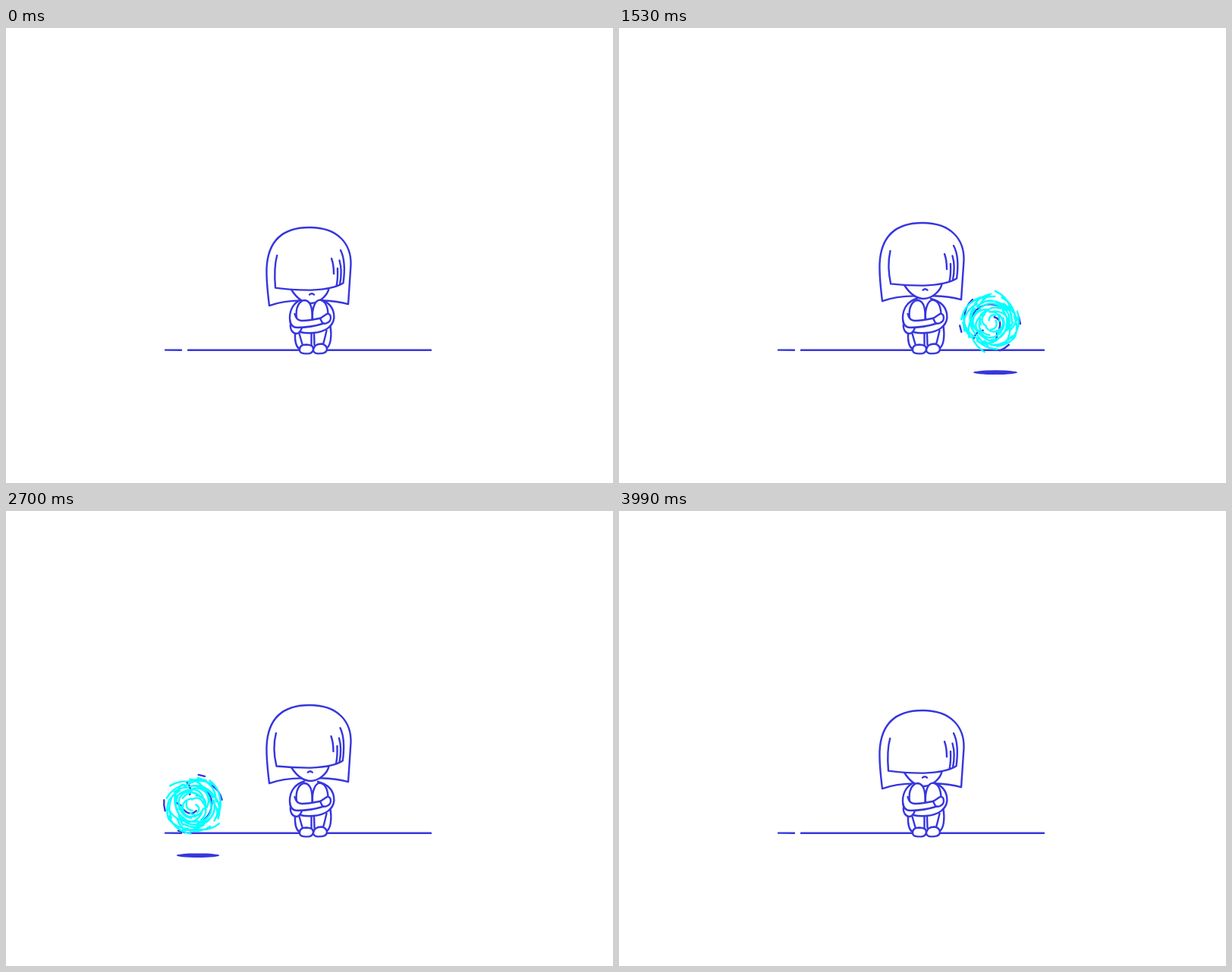
Recreate the animation shown at these times as an HTML page with a canvas. Size 800 by 600 pixels, loop 5850 ms.

```html
<!DOCTYPE html>
<html lang="en">
<head>
<meta charset="utf-8">
<title>Rolling thoughts</title>
<style>
html, body { margin: 0; width: 100%; height: 100%; overflow: hidden; background: #fff; }
canvas { display: block; width: 800px; height: 600px; }
</style>
</head>
<body>
<canvas id="stage" width="800" height="600"></canvas>
<script>
const LOOP = 5850, START = 90, END = 3990, STEP = 30;
const BLUE = '#3636de', CYAN = '#00ffff';
const ctx = document.getElementById('stage').getContext('2d');

// Smooth monotone curve through [time, value] pairs.
function track(...keys) {
  const n = keys.length;
  const slope = keys.slice(1).map((k, i) => (k[1] - keys[i][1]) / (k[0] - keys[i][0]));
  const tangent = keys.map((k, i) => {
    if (i === 0) return slope[0];
    if (i === n - 1) return slope[n - 2];
    const a = slope[i - 1], b = slope[i];
    return a * b <= 0 ? 0 : 2 * a * b / (a + b);
  });
  return t => {
    if (t <= keys[0][0]) return keys[0][1];
    if (t >= keys[n - 1][0]) return keys[n - 1][1];
    let i = 0;
    while (t > keys[i + 1][0]) i++;
    const [t0, v0] = keys[i], [t1, v1] = keys[i + 1];
    const d = t1 - t0, u = (t - t0) / d, w = 1 - u;
    return v0 * (1 + 2 * u) * w * w + tangent[i] * d * u * w * w +
      v1 * u * u * (3 - 2 * u) - tangent[i + 1] * d * u * u * w;
  };
}

const ballX = track([90, 842], [690, 693], [1290, 550], [1530, 490], [1890, 422],
  [2220, 351], [2460, 298], [2700, 248], [3120, 175], [3660, 52], [3990, -45]);
const shadowLag = track([90, -2], [690, -2], [1530, 6], [2220, 0.5], [2700, 5], [3990, 5]);
const headLift = track([90, 0], [390, 3], [690, 6], [1860, 6], [2220, 7], [2400, 7.7],
  [2700, 7], [3120, 5.4], [3690, 2], [3990, 0]);
const lookX = track([90, 0], [690, 2], [1290, 0.5], [1860, 0.5], [2220, -1.7],
  [2700, -2.2], [3120, -0.7], [3690, 0], [3990, 0]);

function line(d, fill) {
  const path = new Path2D(d);
  if (fill) {
    ctx.fillStyle = '#fff';
    ctx.fill(path);
  }
  ctx.stroke(path);
}

function drawFloor() {
  line('M210 424.6L231 424.8M240 424.8H387M423 424.8H560');
}

function drawHair() {
  line('M390 359.4Q365 359.5 347 366.2C345 350 343 333 343.5 317C345 284 361 263 400 263' +
    'C439 263 455 286 454.5 312L451 364.2Q436 360 414 359.3', true);
}

function drawTorso() {
  line('M393 356.5C380 360 374 371 374 382C374 391 378 395 384 395L388 401' +
    'C392 402 399 402.5 405 402C420 401 431 394 432.4 382C432.5 371 427 361 411 357', true);
}

function drawFace(lift, look) {
  const n = lift / 6;
  const left = 355 + 2.8 * n + 0.8 * look, low = 342.6 + 0.8 * n;
  const right = 444.5 + 0.3 * n + 0.5 * look;
  const belly = 353.8 + 0.6 * n + 0.8 * look;
  const side = Math.max(look - 0.5, 0) * 1.4 + Math.min(look, 0) * 0.25;
  line('M376 345C383 356 392 363 402 363C414 362 424 352 425.5 343.5', true);
  line(`M${357.2 + 0.6 * look} 300C${belly} 312 ${belly} 328 ${left} ${low}` +
    `Q${left + 22} 345.8 402 345.6Q432 344.5 ${right} 336.3` +
    `C${right + 2.5} 318 ${right + 1.5} 303 ${441 + side} 293`);
  ctx.save();
  ctx.translate(side, 0);
  line('M429 304Q432 312 432 324M439.5 306.5C442 315 442 328 440 338M437 317Q437.6 330 435.6 340');
  ctx.restore();
  line(`M${400 + look} 351.6Q${403 + look} 349 ${406 + look} 351.6`);
}

function drawLimbs() {
  line('M381 402C380.5 412 382 420 386.5 423M386.5 403L390.5 417M402.5 402V418' +
    'M406 402L406.5 418M422.5 399Q420 410 418 417M427.5 393C429.5 406 428 418 423 422');
  line('M383 383C381 368 387 359 394 359C402 360 404 372 403.5 384', true);
  line('M404 384C403 368 408 358.6 414 358.6C421 360 424 368 424.5 377', true);
  line('M375 390C374 398 378 403 383 403C388 402 389 398 390 395', true);
  line('M380.5 377C382 383 386 386 390 386C400 386 408 384 415 382.5L419 389.5' +
    'C408 393 396 395 384 395C378 395 374.5 391 374.2 384', true);
  line('M414 383L423 377C428 376 429 382 427 386C424 390 419 391 416.5 388Z', true);
  line('M387 424C387 418 392 417.5 396 417.5C402 418 405 419 405 424' +
    'C404 430 398 429.4 394 429.4C389 429 387 428 387 424Z', true);
  line('M405 424C406 418 411 416.5 416 416.5C421 417.5 423 420 423 424' +
    'C422 429.5 416 429.4 411 429.4C407 429 405 428 405 424Z', true);
}

function random(seed) {
  return () => (seed = (seed * 16807) % 2147483647) / 2147483647;
}

// Tangled thread: loose strokes that drift in and out as they circle the middle.
function makeThread() {
  const rnd = random(90210), path = new Path2D(), count = 50;
  for (let i = 0; i < count; i++) {
    const r = 3 + 34 * Math.sqrt((i + 0.5) / count);
    const a = i * 2.4 + rnd() * 0.6;
    const span = Math.min(1.7, (16 + 26 * rnd()) / r);
    const drift = (rnd() - 0.5) * 11;
    const point = (angle, radius) => [radius * Math.cos(angle), radius * Math.sin(angle)];
    path.moveTo(...point(a, r + drift));
    path.quadraticCurveTo(...point(a + span / 2, r / Math.cos(span / 2)),
      ...point(a + span, r - drift));
  }
  return path;
}

const thread = makeThread();
const darkThread = new Path2D('M35 3Q36 16 27 26M-16 -37Q-22 -34 -27 -28M37 -18L40 -10' +
  'M-39 1L-36 10M-30 14Q-24 20 -17 22M25 -6C27 17 6 29 -16 18' +
  'M-12 -9Q-15 4 -4 6M-9 -24Q-11 -18 -9 -12M20 -25Q18 -15 9 -13');

function drawBall(t) {
  const phase = (t - 690) / 570 + 0.03;
  const rise = ((1 - Math.cos(phase * Math.PI * 2)) / 2) ** 2;
  const x = ballX(t);

  ctx.fillStyle = BLUE;
  ctx.beginPath();
  ctx.ellipse(x + shadowLag(t), 454.2, 16.3 + 12.7 * rise, 1.6 + 1.3 * rise, 0, 0, Math.PI * 2);
  ctx.fill();

  ctx.save();
  ctx.translate(x, 415.8 - 29 * rise);
  ctx.rotate(-(t - 690) * 0.207 * Math.PI / 180);
  ctx.stroke(darkThread);
  ctx.strokeStyle = CYAN;
  ctx.stroke(thread);
  ctx.restore();
}

function draw(t) {
  const lift = headLift(t), look = lookX(t);
  const raised = fn => {
    ctx.save();
    ctx.translate(0, -lift);
    fn();
    ctx.restore();
  };
  ctx.fillStyle = '#fff';
  ctx.fillRect(0, 0, 800, 600);
  ctx.strokeStyle = BLUE;
  ctx.lineWidth = 2.4;
  ctx.lineCap = ctx.lineJoin = 'round';

  drawFloor();
  raised(drawHair);
  drawTorso();
  raised(() => drawFace(lift, look));
  drawLimbs();
  if (t >= START && t < END) drawBall(t);
}

const origin = performance.now();
function tick() {
  const t = Math.max(0, performance.now() - origin) % LOOP;
  draw(Math.floor(t / STEP) * STEP);
  requestAnimationFrame(tick);
}
tick();
</script>
</body>
</html>
```
